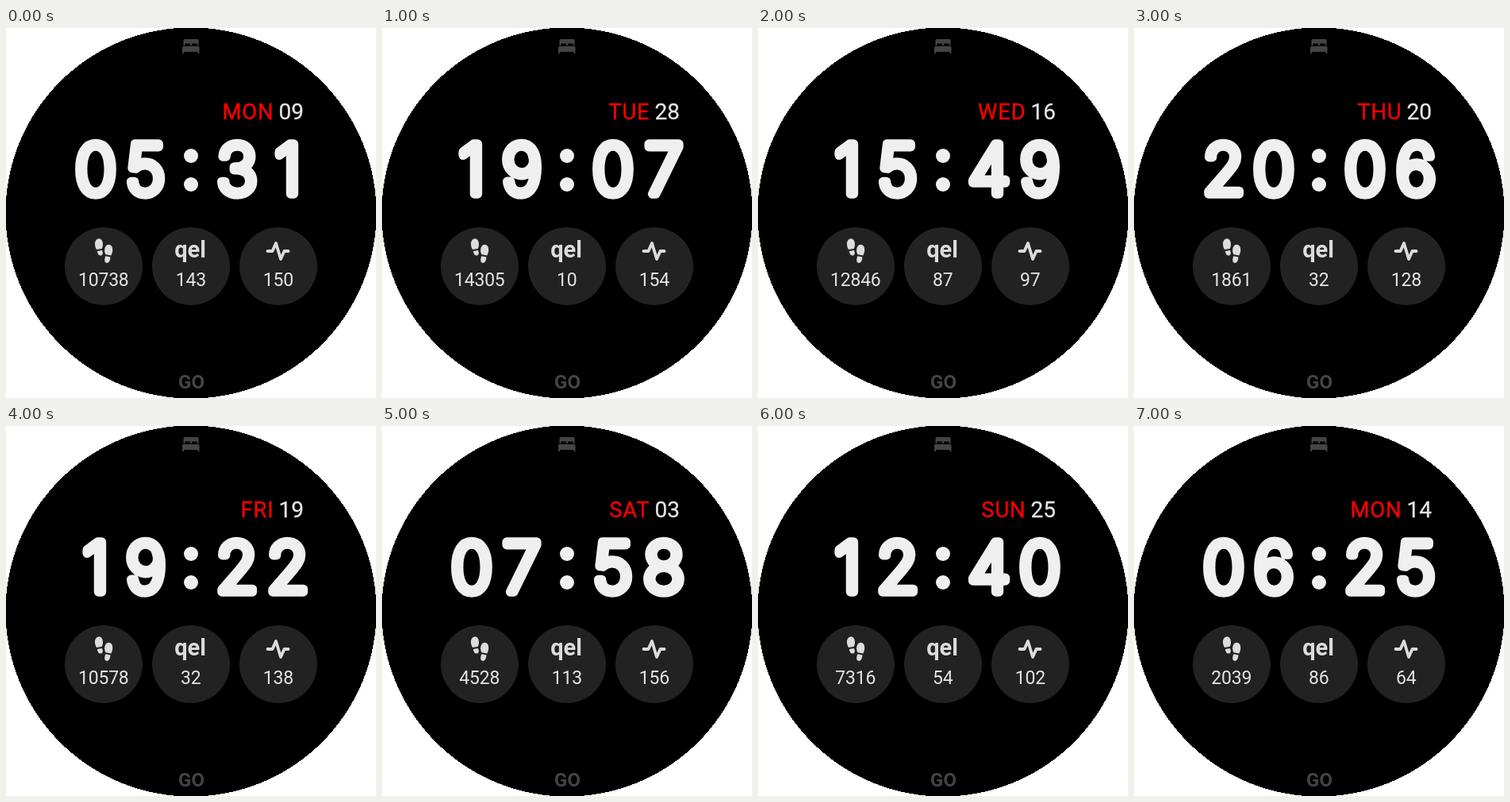
Recreate the animation shown at these times as an HTML page. Size 466x466 px, loop 8000 ms.

```html
<!DOCTYPE html>
<html lang="en">
<head>
<meta charset="utf-8">
<title>Watch face</title>
<style>
  html, body { margin: 0; width: 100%; height: 100%; overflow: hidden; background: #fff; }
  svg { display: block; width: 466px; height: 466px; }
  text { font-family: Roboto, sans-serif; fill: #e4e4e4; }
  .time text { font: 200 86px Inter, sans-serif; fill: #efefef; stroke: #efefef; stroke-width: 11.5; stroke-linejoin: round; text-anchor: middle; }
  .date { font-size: 28px; text-anchor: end; stroke: #e4e4e4; stroke-width: .3; }
  .date.day { font-size: 27.5px; letter-spacing: .8px; fill: #f00; stroke: #f00; }
  .value { font-size: 23px; letter-spacing: -.2px; text-anchor: middle; }
  .badge { font-size: 29px; font-weight: 700; fill: #dcdcdc; text-anchor: middle; }
  .go { font-size: 24px; font-weight: 700; fill: #444; text-anchor: middle; }
</style>
</head>
<body>
<svg viewBox="0 0 466 466">
  <circle cx="233" cy="233" r="233.600" shape-rendering="crispEdges"/>
  <path fill="#444" d="M225 14h16q1.5 0 1.5 1.5v6.500h-2v-2.500h-6.500v2.500h-2v-2.500h-6.500v2.500h-2v-6.500q0-1.500 1.500-1.500zM223.500 23h18.500q1.500 0 1.500 1.500v7.500h-2v-2h-17.500v2h-2v-7.500q0-1.500 1.500-1.500z"/>
  <text class="go" x="233.500" y="454">GO</text>

  <text class="date day" id="day" x="337.500" y="115"></text>
  <text class="date" id="num" x="375" y="115"></text>

  <g class="time" id="time">
    <text x="113" y="208.500"></text>
    <text x="176" y="208.500"></text>
    <text x="291" y="208.500"></text>
    <text x="355" y="208.500"></text>
  </g>
  <g fill="#efefef">
    <circle cx="233" cy="161" r="9"/>
    <circle cx="233" cy="197" r="9"/>
  </g>

  <g fill="#222">
    <circle cx="123" cy="300" r="49"/>
    <circle cx="233" cy="300" r="49"/>
    <circle cx="343" cy="300" r="49"/>
  </g>
  <g fill="#dcdcdc">
    <path d="M116 265.500c4-1 6.500 3.500 6 8q-.3 3-1.500 4.500l-6.500 1c-2.500-4-3.500-12 2-13.500zM114.800 281l6.200-1c1.500 3.500 1 6-1.500 6.500-2.700.5-4.200-2-4.700-5.500z"/>
    <path d="M130.500 273c5 1.500 4.500 9 1.800 13.500l-6.800-1.300c-1-2-1.500-3.500-1.300-5.700.3-4.500 3-7.500 6.300-6.500zM125.300 287.300l6.200 1.200c-.3 4.500-2 8-5 7.300-2.700-.6-2.800-4-1.200-8.500z"/>
  </g>
  <text class="badge" x="232" y="289">qel</text>
  <path d="M329.500 281h6l4.500-10 6 20 4.500-10h5" fill="none" stroke="#dcdcdc" stroke-width="3.800" stroke-linecap="round" stroke-linejoin="round"/>

  <g id="values">
    <text class="value" x="122.800" y="325"></text>
    <text class="value" x="232.800" y="325"></text>
    <text class="value" x="342.800" y="325"></text>
  </g>
</svg>
<script>
  const STEP = 1000;
  // day, date, time, steps, score, pulse
  const states = [
    "MON 09 0531 10738 143 150",
    "TUE 28 1907 14305 10 154",
    "WED 16 1549 12846 87 97",
    "THU 20 2006 1861 32 128",
    "FRI 19 1922 10578 32 138",
    "SAT 03 0758 4528 113 156",
    "SUN 25 1240 7316 54 102",
    "MON 14 0625 2039 86 64"
  ].map(row => row.split(" "));

  const day = document.getElementById("day");
  const num = document.getElementById("num");
  const digits = document.getElementById("time").children;
  const values = document.getElementById("values").children;
  const fill = (nodes, texts) => texts.forEach((t, i) => nodes[i].textContent = t);

  let shown = -1;
  function draw(ms) {
    const i = Math.floor(ms / STEP) % states.length;
    if (i === shown) return;
    shown = i;
    const [name, date, time, ...stats] = states[i];
    day.textContent = name;
    num.textContent = date;
    fill(digits, [...time]);
    fill(values, stats);
  }

  const start = performance.now();
  function tick() {
    draw(performance.now() - start);
    requestAnimationFrame(tick);
  }
  tick();
</script>
</body>
</html>
```
